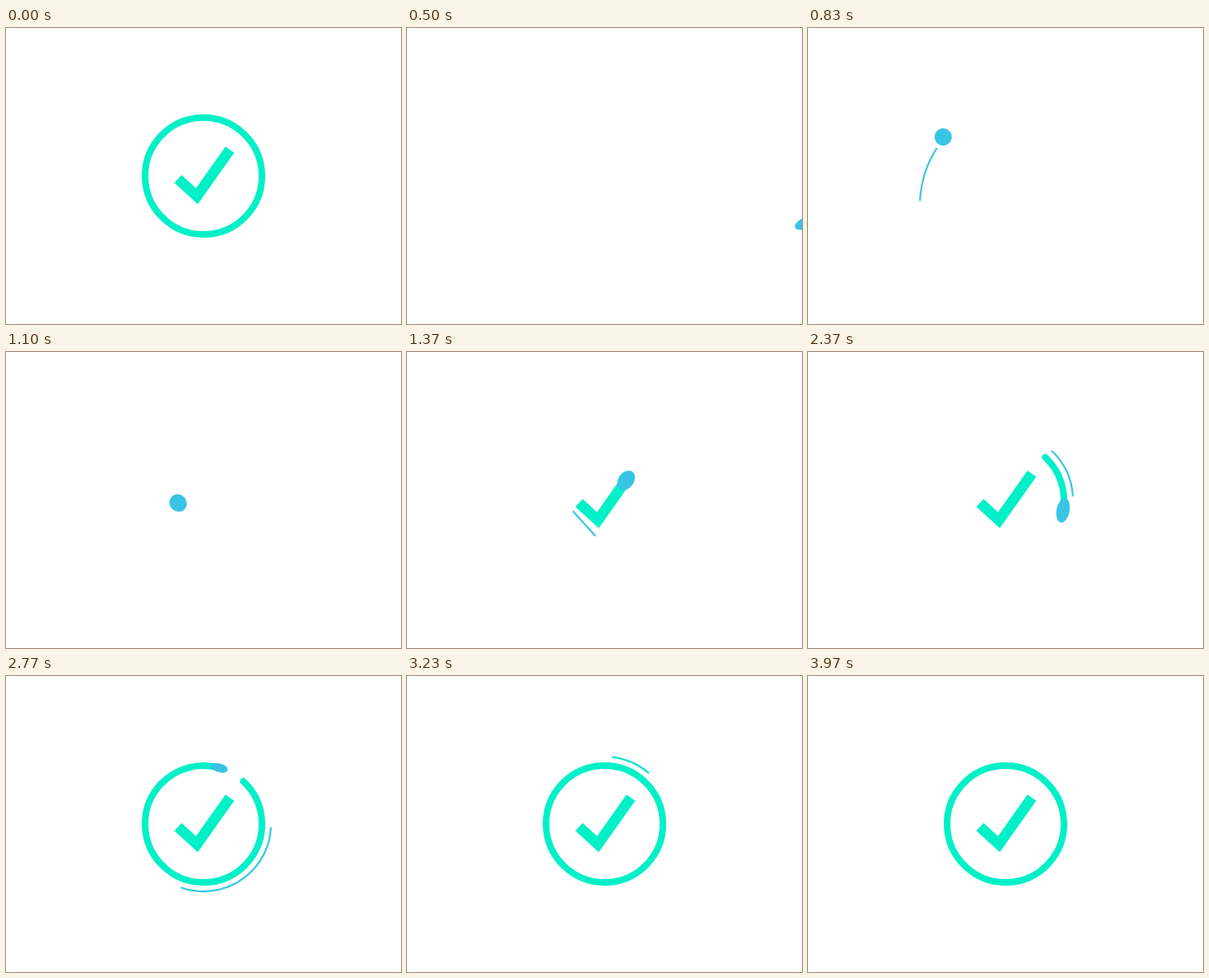
These frames come from a looping animation (480 px wide and 360 px high, 4010 ms). An HTML page:

```html
<!DOCTYPE html>
<html lang="en">
<head>
<meta charset="utf-8">
<title>Check mark</title>
<style>
  html, body { margin: 0; width: 100%; height: 100%; overflow: hidden; background: #fff; }
  svg { display: block; width: 480px; height: 360px; }
  path { fill: none; }
  .trail { stroke-width: 2.2; stroke-linecap: round; }
</style>
</head>
<body>
<svg id="stage" viewBox="0 0 480 360"></svg>
<script>
const LOOP = 4010, GREEN = '#00f0c8', BLUE = '#38c5e5';
const stage = document.getElementById('stage');

function add(tag, attrs) {
  const el = document.createElementNS('http://www.w3.org/2000/svg', tag);
  for (const name in attrs) el.setAttribute(name, attrs[name]);
  return stage.appendChild(el);
}

const clamp = u => Math.min(1, Math.max(0, u));
const easeIn = (start, end, power) => t => clamp((t - start) / (end - start)) ** power;
const easeOut = (start, end, power) => t => 1 - (1 - clamp((t - start) / (end - start))) ** power;

const line = (d, attrs) => add('path', { d, ...attrs });
const guide = d => line(d, { stroke: 'none' });
const trail = (d, head, tail, endColor) =>
  ({ el: line(d, { class: 'trail', stroke: BLUE }), head, tail, endColor });

// Clockwise circle around the stage centre that starts at the upper right.
function circle(r) {
  const angle = -47 * Math.PI / 180;
  const x = r * Math.cos(angle), y = r * Math.sin(angle);
  const half = `a${r},${r} 0 0 1`;
  return `M${240 + x},${180 + y} ${half} ${-2 * x},${-2 * y} ${half} ${2 * x},${2 * y}`;
}

const check = line('M209,183.5 L232,204.5 L272,148', { stroke: GREEN, 'stroke-width': 13 });
const ring = line(circle(71), { stroke: GREEN, 'stroke-width': 8, 'stroke-linecap': 'round' });
const drawCheck = easeIn(1060, 1382, 3), drawRing = easeIn(1870, 2795, 3);

const trails = [
  trail('M500,245 C400,280 142,300 136,211 Q138,175 156,147 Q164,134 174,125',
    easeOut(540, 1000, 2.85), easeOut(600, 1040, 2.2), BLUE),
  trail('M202,194 L233,228 L282,159',
    easeIn(1110, 1585, 2), easeIn(1350, 1950, 3), GREEN),
  trail(circle(82),
    easeIn(1985, 3237, 1.8), easeIn(2236, 3267, 3), GREEN)
];

// The ball follows these paths in turn, each until its end time.
const route = [
  { end: 830, at: easeOut(500, 830, 1.3),
    path: guide('M492,235 C400,268 150,292 142,205 C142,180 152,150 164,133') },
  { end: 1060, at: easeOut(830, 1060, 1.3),
    path: guide('M164,133 C176,113 192,108 202,126 C209,140 209,165 209,183.5') },
  { end: 1382, at: drawCheck, path: check },
  { end: 1870, at: easeOut(1382, 1870, 1.5),
    path: guide('M272,148 L283,128 C289,116 299,114 297,122 Q295,128 288.4,128.1') },
  { end: 2795, at: drawRing, path: ring }
];

// Time, radius along the motion, radius across it.
const sizes = [
  [500, 20, 8], [830, 10.5, 10.5], [1060, 10.5, 10.5], [1370, 13, 9.5], [1530, 10.5, 10.5],
  [2000, 10.5, 10.5], [2370, 15, 8], [2600, 16, 7.5], [2770, 11, 5.5], [2795, 4, 4]
];
const ball = add('ellipse', { fill: BLUE });

function show(el, visible) {
  el.setAttribute('visibility', visible ? 'visible' : 'hidden');
}

function trim(el, from, to) {
  const length = el.getTotalLength();
  show(el, to > from);
  el.setAttribute('stroke-dasharray', `${(to - from) * length} ${length * 2}`);
  el.setAttribute('stroke-dashoffset', -from * length);
}

function placeBall(t) {
  const leg = route.find(r => t < r.end);
  const visible = t >= 500 && !!leg;
  show(ball, visible);
  if (!visible) return;

  const s = leg.at(t) * leg.path.getTotalLength();
  const [before, p, after] = [s - 0.5, s, s + 0.5].map(x => leg.path.getPointAtLength(x));
  const angle = Math.atan2(after.y - before.y, after.x - before.x) * 180 / Math.PI;

  const i = sizes.findIndex(k => t < k[0]);
  const a = sizes[i - 1], b = sizes[i], u = (t - a[0]) / (b[0] - a[0]);
  ball.setAttribute('rx', a[1] + (b[1] - a[1]) * u);
  ball.setAttribute('ry', a[2] + (b[2] - a[2]) * u);
  ball.setAttribute('transform', `translate(${p.x} ${p.y}) rotate(${angle})`);
}

function render(time) {
  const clock = time % LOOP;
  const t = clock < 30 ? LOOP : clock; // the finished mark stays briefly, then vanishes
  trim(check, 0, drawCheck(t));
  trim(ring, 0, drawRing(t));
  for (const { el, head, tail, endColor } of trails) {
    trim(el, tail(t), head(t));
    el.style.stroke = `color-mix(in srgb, ${BLUE}, ${endColor} ${tail(t) * 70}%)`;
  }
  placeBall(t);
}

const start = performance.now();
function tick() {
  render(performance.now() - start);
  requestAnimationFrame(tick);
}
tick();
</script>
</body>
</html>
```
